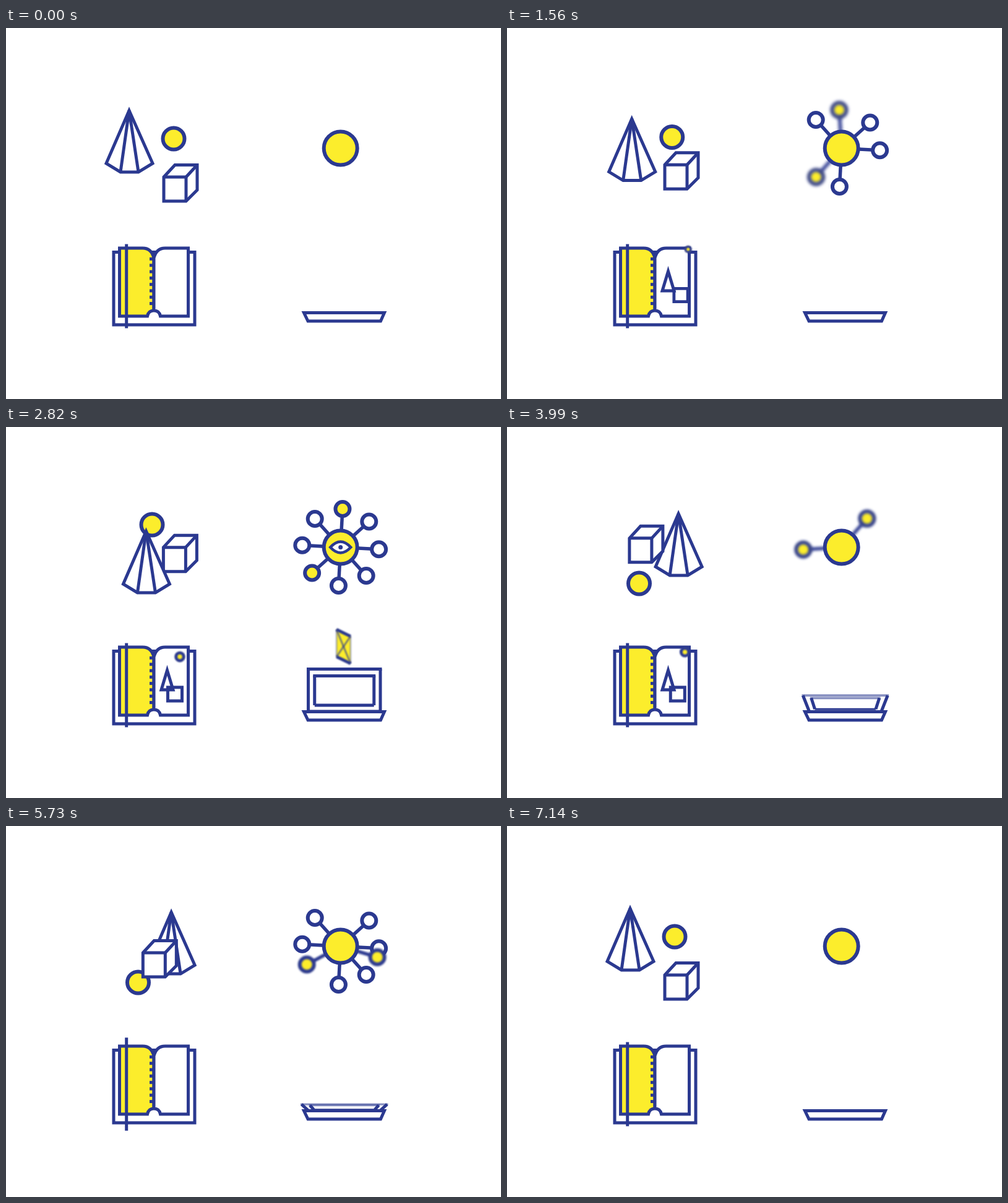
Recreate the animation shown at these times as an HTML page with a canvas. Size 800 by 600 pixels, loop 7.2 s.

```html
<!DOCTYPE html>
<html lang="en">
<head>
<meta charset="utf-8">
<title>Icon loops</title>
<style>
html, body { margin: 0; width: 100%; height: 100%; overflow: hidden; background: #fff; }
canvas { display: block; }
</style>
</head>
<body>
<canvas width="800" height="600"></canvas>
<script>
const ctx = document.querySelector('canvas').getContext('2d');
const NAVY = '#2b3990', YELLOW = '#fced2c', WHITE = '#fff';
const LOOP = 7200;

const ease = u => u < .5 ? 2 * u * u : 1 - 2 * (1 - u) ** 2;
const span = (t, a, b) => Math.min(1, Math.max(0, (t - a) / (b - a)));
const ramp = (t, a, b) => ease(span(t, a, b));

// Follows legs of the form [start, end, ...target] from a first value.
function track(t, from, legs) {
  return legs.reduce((v, [a, b, ...to]) => {
    const k = ramp(t, a, b);
    return v.map((x, i) => x + (to[i] - x) * k);
  }, from);
}

function paint(fill, width = 5) {
  if (fill) { ctx.fillStyle = fill; ctx.fill(); }
  if (width) { ctx.lineWidth = width; ctx.stroke(); }
}

function poly(points, fill, width, open) {
  ctx.beginPath();
  points.forEach(p => ctx.lineTo(...p));
  if (!open) ctx.closePath();
  paint(fill, width);
}

const line = (x1, y1, x2, y2, width) => poly([[x1, y1], [x2, y2]], null, width, true);

function disc(x, y, r, fill, width = 6) {
  ctx.beginPath();
  ctx.arc(x, y, r, 0, 7);
  paint(fill, width);
}

function at(x, y, draw, scale = 1) {
  if (scale <= 0) return;
  ctx.save();
  ctx.translate(x, y);
  ctx.scale(scale, scale);
  draw();
  ctx.restore();
}

function blurred(px, draw) {
  ctx.save();
  if (px > .2) ctx.filter = `blur(${px.toFixed(2)}px)`;
  draw();
  ctx.restore();
}

// Solids: ball, pyramid and cube trade places
function pyramid() {
  poly([[0, 6.4], [-37, 92], [-14, 106], [15, 106], [38, 92]], WHITE);
  line(0, 6.4, -14, 106);
  line(0, 6.4, 15, 106);
}

function cube() {
  poly([[0, 0], [18, -19.5], [54, -19.5], [54, 21], [36, 39], [0, 39]], WHITE);
  poly([[0, 0], [36, 0], [36, 39]], null, 5, true);
  line(36, 0, 54, -19.5);
}

function solids(t) {
  const ball = track(t, [271, 179], [[40, 330, 213.5, 253], [640, 960, 236, 158], [1320, 1640, 271, 179]]);
  const tip = track(t, [199, 127], [[95, 415, 278, 134], [835, 1127, 208, 172], [1365, 1685, 199, 127]]);
  const box = track(t, [255, 241], [[153, 553, 170, 150], [645, 1045, 255, 195], [1400, 1700, 255, 241]]);
  disc(...ball, 17.5, YELLOW);
  const drawTip = () => at(...tip, pyramid), drawBox = () => at(...box, cube);
  if (t < 600) { drawTip(); drawBox(); } else { drawBox(); drawTip(); }
}

// Network: two yellow nodes circle the hub and leave white ones behind
const HUB = [540.7, 194.5];
const TURNS = [[175, 875, -42], [870, 1180, -132], [1250, 1850, -312], [1962, 2662, -582]];
const heading = t => track(t, [228], TURNS)[0];

function node(deg, reach, fill) {
  const a = deg * Math.PI / 180;
  const x = HUB[0] + reach * Math.cos(a), y = HUB[1] + reach * Math.sin(a);
  line(...HUB, x, y, 5.5);
  disc(x, y, 11.5, fill);
}

function network(t) {
  const [reach] = track(t, [0], [[100, 260, 62], [3030, 3400, 0]]);
  if (reach > 0) {
    TURNS.slice(0, 3).forEach(([, , deg], i) => {
      if (t < TURNS[i + 1][0]) return;
      node(deg, reach, WHITE);
      node(deg + 135, reach, WHITE);
    });
    const a = heading(t), speed = Math.abs(heading(t + 5) - heading(t - 5)) / 10;
    blurred(speed * 5, () => {
      node(a, reach, YELLOW);
      node(a + 135, reach, YELLOW);
    });
  }
  disc(...HUB, 27, YELLOW);
  const p = t % 1800, lid = ramp(p, 500, 650) - ramp(p, 1300, 1450);
  if (lid > 0) at(...HUB, () => {
    ctx.beginPath();
    ctx.moveTo(-16.5, 0);
    ctx.quadraticCurveTo(0, -18 * lid, 16.5, 0);
    ctx.quadraticCurveTo(0, 18 * lid, -16.5, 0);
    ctx.closePath();
    paint(WHITE, 4.5);
    disc(0, 0, 3.5 * lid, NAVY, 0);
  });
}

// Book: shapes come and go on the right page, the ribbon stretches
function page(side) {
  ctx.beginPath();
  ctx.moveTo(239, 457);
  ctx.lineTo(239, 372);
  ctx.quadraticCurveTo(239 + side * 4, 356, 239 + side * 18, 356);
  ctx.lineTo(239 + side * 55.5, 356);
  ctx.lineTo(239 + side * 55.5, 466);
  ctx.lineTo(239 + side * 10.5, 466);
  ctx.quadraticCurveTo(239 + side * 9, 457, 239, 457);
  paint(side < 0 ? YELLOW : WHITE);
}

function book(t) {
  poly([[184, 362.5], [174, 362.5], [174, 480], [305, 480], [305, 362.5], [295, 362.5]], WHITE, 5, true);
  poly([[234, 360], [244, 360], [239, 372]], NAVY, 0);
  page(-1);
  page(1);
  ctx.fillStyle = NAVY;
  for (let i = 0; i < 8; i++) ctx.fillRect(232, 371 + 10.3 * i, 6, 5);

  const out = ramp(t, 620, 800);
  at(260.5, 413, () => poly([[0, -19.5], [9.5, 12], [-9.5, 12]]), ramp(t, 150, 330) - out);
  const slide = 30 * (1 - ramp(t, 230, 440));
  at(272.5 + slide, 432, () => poly([[-11.5, -11], [11.5, -11], [11.5, 11], [-11.5, 11]]),
    ramp(t, 230, 380) - out);
  const [x, y] = track(t, [297, 353], [[300, 510, 272, 382]]);
  const grow = ramp(t, 300, 400) - out;
  if (grow > 0) blurred(t < 510 ? 1 : 0, () => at(x, y, () => disc(0, 0, 6.3, YELLOW, 5), grow));

  const d = Math.abs(t - 870);
  const stretch = d < 190 ? 4.75 * (1 + Math.cos(Math.PI * d / 190)) : 0;
  line(194.7, 349.5 - stretch, 194.7, 485.5 + stretch, 5);
}

// Laptop: the lid opens, a card spins up and drops back
function card(t) {
  if (t < 518 || t > 1102) return;
  const a = 4.41 * (t - 810) / 180, c = Math.cos(a), s = Math.sin(a);
  const pt = (x, y) => [x * c, y + x * s * .15];
  const q = [pt(-38, -22), pt(38, -22), pt(38, 22), pt(-38, 22)];
  blurred(1.2, () => at(545.5, 315 + (t - 810) ** 2 * .001235, () => {
    poly(q, YELLOW, 0);
    line(...q[0], ...q[1], 5);
    line(...q[2], ...q[3], 5);
    ctx.globalAlpha = .6;
    line(...q[0], ...q[2], 3);
    line(...q[1], ...q[3], 3);
    ctx.globalAlpha = .35;
    line(...q[0], ...q[3], 3);
    line(...q[1], ...q[2], 3);
  }));
}

function frame(half, low, high, open) {
  const s = Math.sin(open), flare = 11 / 58.25 * Math.cos(open);
  const pt = (side, v) => [546.75 + side * half * (1 + flare * v), 460 - 68.5 * s * v];
  const q = [pt(-1, low), pt(-1, high), pt(1, high), pt(1, low)];
  poly(q, WHITE, 0);
  line(...q[0], ...q[1], 5);
  line(...q[2], ...q[3], 5);
  line(...q[0], ...q[3], 2 + 3 * s);
  ctx.globalAlpha = s < .99 ? .55 : 1;
  ctx.lineCap = 'square';
  line(...q[1], ...q[2], 3 + 2 * s);
  ctx.lineCap = 'butt';
  ctx.globalAlpha = 1;
}

function laptop(time) {
  const t = Math.floor(time / 45) * 45;
  card(t);
  const open = (ramp(t, 244, 575) - ramp(t, 1130, 1440)) * Math.PI / 2;
  if (open > 0) {
    frame(58.25, 0, 1, open);
    frame(48, .146, .84, open);
  }
  poly([[481.5, 460.5], [611.5, 460.5], [605.5, 474], [488, 474]], WHITE);
}

const begin = performance.now();
function tick() {
  const t = (performance.now() - begin) % LOOP;
  ctx.fillStyle = WHITE;
  ctx.fillRect(0, 0, 800, 600);
  ctx.strokeStyle = NAVY;
  solids(t % 1800);
  network(t % 3600);
  book(t % 1200);
  laptop(t % 1800);
  requestAnimationFrame(tick);
}
tick();
</script>
</body>
</html>
```
